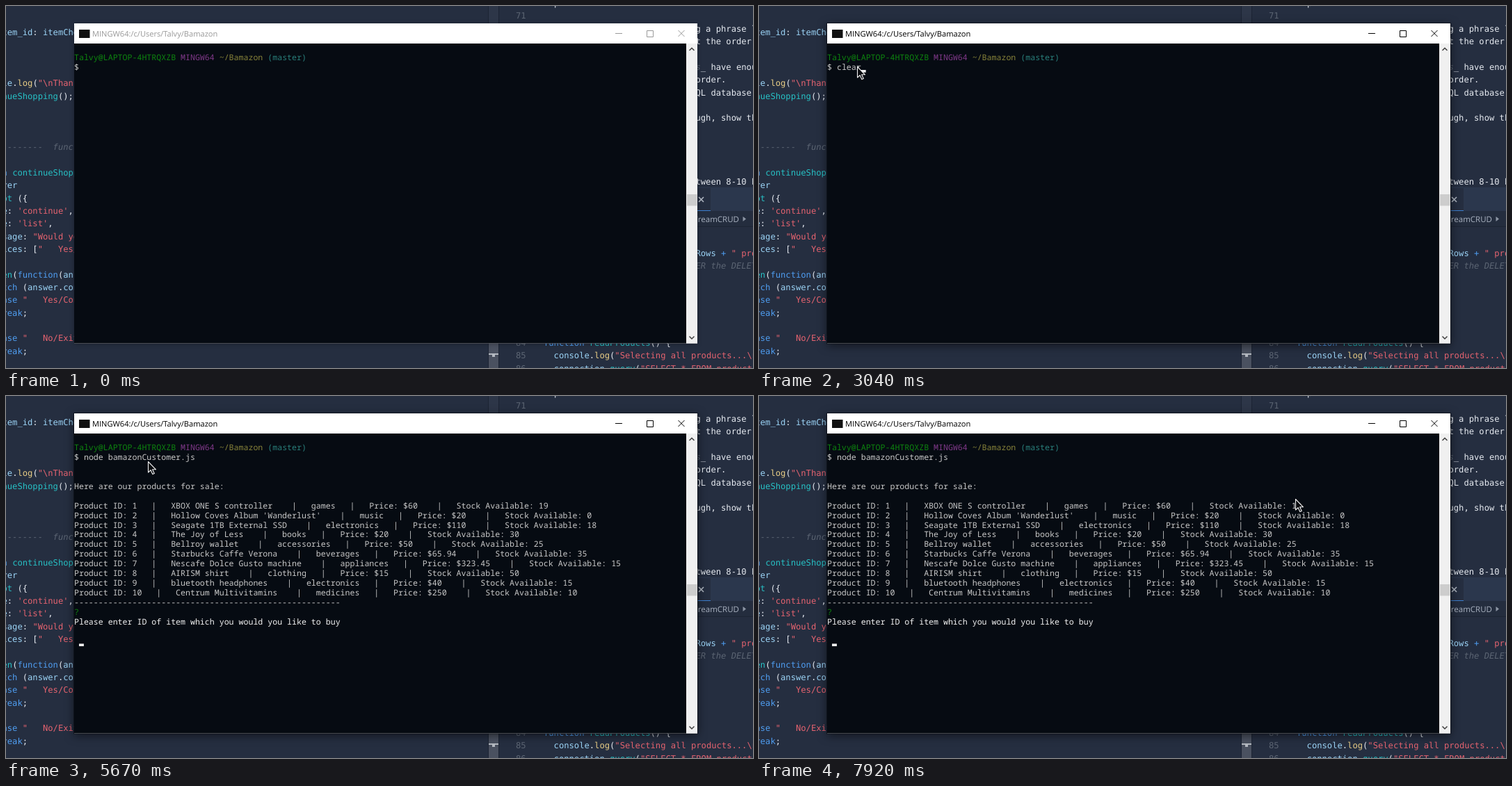
An HTML page for the animation above (8 s loop, 1074x521 px).

```html
<!DOCTYPE html>
<html lang="en">
<head>
<meta charset="utf-8">
<title>Terminal session</title>
<style>
  html, body { margin: 0; width: 100%; height: 100%; overflow: hidden; background: #252e40; }
  svg { display: block; }
  text { white-space: pre; text-rendering: geometricPrecision; }
  .code { font: 12.15px "DejaVu Sans Mono", monospace; }
  .term { font: 11.6px "Noto Sans Mono", monospace; }
  .ui { font: 11.1px "Open Sans", sans-serif; }
  .line { fill: none; stroke-width: 1; }
</style>
</head>
<body>
<svg width="1074" height="521" viewBox="0 0 1074 521" xml:space="preserve">
  <g id="editor">
    <rect width="1074" height="521" fill="#252e40"/>
    <rect x="694" width="14" height="521" fill="#2d3648"/>
    <path class="line" d="M693.5 0V521M708.5 0V521" stroke="#1c2433"/>
    <rect x="694" y="485" width="14" height="36" fill="#4a5160"/>
    <path d="M694 500h14v2h-5v3h-4v-3h-5z" fill="#b4b9c1"/>
    <rect x="980" y="261" width="94" height="34" fill="#2b374d"/>
    <rect x="980" y="262" width="33" height="33" fill="#252e40"/>
    <rect x="980" y="294" width="33" height="1" fill="#3d7fd0"/>
    <rect x="980" y="295" width="94" height="22" fill="#242d3e"/>
    <rect x="980" y="317" width="94" height="1" fill="#1d2534"/>
    <path class="line" d="M996 275l7 7m0-7l-7 7" stroke="#aeb5c0" style="stroke-width:1.6"/>
    <text class="ui" x="1054" y="311" text-anchor="end" fill="#a9b2c0" style="font-size:11.5px">IceCreamCRUD</text>
    <path d="M1059.5 303l4.5 3.5-4.5 3.5z" fill="#8d96a5"/>
  </g>
  <rect id="border" x="97.5" y="24.5" width="897" height="461.5" fill="none" stroke="#0a0e16" stroke-opacity=".6"/>
  <rect id="frame" x="98" y="25" width="896" height="460.5" fill="#fff"/>
  <rect x="105" y="34" width="15.5" height="12" fill="#111"/>
  <text class="ui" id="title" x="124" y="44">MINGW64:/c/Users/Talvy/Bamazon</text>
  <path class="line" id="controls" d="M876 39.5h10M921.5 35.5h9v9h-9zM966.5 35l9 9m0-9l-9 9"/>
  <rect x="98" y="54" width="880" height="431.5" fill="#060b12"/>
  <rect x="978" y="54" width="16" height="431.5" fill="#f0f0f0"/>
  <rect x="979" y="271" width="14.5" height="16.5" fill="#cdcdcd"/>
  <path class="line" d="M982.5 64l3.5-3.5 3.5 3.5M982.5 475.5l3.5 3.5 3.5-3.5" stroke="#404040" style="stroke-width:1.5"/>
  <g id="prompt"></g>
  <g id="products"></g>
  <g id="question"></g>
  <rect id="caret" width="6.96" height="3.6" fill="#f0f0f0"/>
  <circle id="click" cx="141" cy="87" r="11.5" fill="#ff0" opacity=".64"/>
  <path id="mouse" d="M.5.5V16l3.6-3.3 2.7 5.9 2.5-1.1-2.7-5.7h4.9z"
        fill="#0a0c10" stroke="#f4f4f4" stroke-width="1.1" stroke-linejoin="round"/>
</svg>
<script>
const $ = id => document.getElementById(id);
const SVG = 'http://www.w3.org/2000/svg';
const COLORS = {
  w: '#e6eaf0', k: '#9bd3f5', b: '#4f9df0', s: '#e5636f', t: '#27c0c4', y: '#e8cd85',
  c: '#5c6573', i: '#5c6573',
  G: '#0d850f', P: '#80398a', O: '#87833a', T: '#2a807c', n: '#c8c8c8', W: '#f2f2f2'
};

// Markup: runs separated by "~~", each starting with its colour key; "i" is also italic.
function addText(parent, className, x, y, markup) {
  const text = parent.appendChild(document.createElementNS(SVG, 'text'));
  text.setAttribute('class', className);
  text.setAttribute('x', x);
  text.setAttribute('y', y);
  for (const run of markup.split('~~')) {
    const span = text.appendChild(document.createElementNS(SVG, 'tspan'));
    span.setAttribute('fill', COLORS[run[0]]);
    if (run[0] === 'i') span.setAttribute('font-style', 'italic');
    span.textContent = run.slice(1);
  }
  return text;
}

const ROW = 18.35;
function addCode(x, firstY, lines) {
  for (const [row, markup] of Object.entries(lines))
    addText($('editor'), 'code', x, firstY + row * ROW + 4, markup);
}

addCode(-5.5, 38, {
  0: 'ktem_id~~w: ~~kitemChoice',
  4: 'kle~~w.~~ylog~~w(~~s"\\nThank you"',
  5: 'tnueShopping~~w();',
  9: 'i--------  function',
  11: 'bn ~~tcontinueShopping',
  12: 'krer',
  13: 'tpt ~~w({',
  14: "ke~~w: ~~s'continue'~~w,",
  15: "ke~~w: ~~s'list'~~w,",
  16: 'ksage~~w: ~~s"Would you',
  17: 'kices~~w: [~~s"   Yes/',
  19: 'ten~~w(~~bfunction~~w(~~kanswer',
  20: 'btch ~~w(~~kanswer~~w.~~kcon',
  21: 'base ~~s"   Yes/Con',
  22: 'break~~w;',
  24: 'base ~~s"   No/Exit',
  25: 'break~~w;'
});
addCode(991.5, 33, {
  0: 'wg a phrase like',
  1: 'wt the order',
  3: 'is~~w_ have enough',
  4: 'worder.',
  5: 'wQL database',
  7: 'wugh, show the',
  12: 'wtween 8-10 h'
});
addCode(991.5, 356, { 0: 'kRows ~~b+ ~~s" products', 1: 'iER the DELETE' });
addCode(733, 14, { 0: 'c71' });
addCode(788, -4, { 0: 'wp' });
addCode(733, 485, { 0: 'c84', 1: 'c85', 2: 'c86' });
addCode(773, 485, {
  0: 'bfunction ~~treadProducts~~w() {',
  1: 'k  console~~w.~~ylog~~w(~~s"Selecting all products...\\n"',
  2: 'k  connection~~w.~~tquery~~w(~~s"SELECT * FROM products"'
});

const CELL = { w: 6.96, h: 13.92 };
const addTerm = (group, row, markup) =>
  addText($(group), 'term', 98, 78.2 + row * CELL.h, markup);

addTerm('prompt', 0, 'GTalvy@LAPTOP-4HTRQXZB ~~PMINGW64 ~~O~/Bamazon ~~T(master)');
const command = addTerm('prompt', 1, 'n$ ~~n').lastChild;

addTerm('products', 4, 'nHere are our products for sale:');
[
  ['XBOX ONE S controller', 'games', '60', 19],
  ["Hollow Coves Album 'Wanderlust'", 'music', '20', 0],
  ['Seagate 1TB External SSD', 'electronics', '110', 18],
  ['The Joy of Less', 'books', '20', 30],
  ['Bellroy wallet', 'accessories', '50', 25],
  ['Starbucks Caffe Verona', 'beverages', '65.94', 35],
  ['Nescafe Dolce Gusto machine', 'appliances', '323.45', 15],
  ['AIRISM shirt', 'clothing', '15', 50],
  ['bluetooth headphones', 'electronics', '40', 15],
  ['Centrum Multivitamins', 'medicines', '250', 10]
].forEach(([name, kind, price, stock], i) => addTerm('products', 6 + i,
  `nProduct ID: ${i + 1}   |   ${name}    |   ${kind}   |   Price: $${price}    |   Stock Available: ${stock}`));
addTerm('products', 16, 'n' + '-'.repeat(55));
addTerm('question', 17, 'G?');
addTerm('question', 18, 'WPlease enter ID of item which you would you like to buy');

// [time, column, row]; no cell means the caret is hidden.
const CARET = [
  [0], [2410, 2, 1], [2960], [3040, 7, 1], [3420, 26, 1], [3500], [4030, 26, 1],
  [4430, 0, 2], [4580], [4890, 0, 17], [4980, 1, 20], [5060], [5580, 1, 20],
  [6140], [6690, 1, 20], [7230], [7770, 1, 20]
];

// Pointer moves: cubic curves sampled in even steps, held between samples.
const MOVES = [
  { start: 230, end: 470, steps: 4, from0: true, path: [[845, 431], [690, 340], [430, 260], [386, 239]] },
  { start: 1160, end: 1630, steps: 7, path: [[386, 239], [200, 130], [26, 24], [141, 87]] },
  { start: 5580, end: 6140, steps: 8, path: [[141, 87], [200, 88], [380, 128], [404, 132]] },
  { start: 6840, end: 7380, steps: 8, path: [[404, 132], [700, 105], [859, 117], [778, 147]] },
  { start: 7460, end: 7610, steps: 3, path: [[778, 147], [778, 148], [775, 148], [774, 148]] },
  { start: 7690, end: 7920, steps: 4, path: [[774, 148], [773, 149], [772, 149], [771, 148]] }
];

const lastBefore = (list, t, time) => list.filter(item => time(item) <= t).pop();

function pointerAt(t) {
  const move = lastBefore(MOVES, t, m => m.start);
  if (!move) return null;
  const { start, end, steps, from0, path } = move;
  const step = Math.min(steps - 1, Math.floor((t - start) / (end - start) * (steps - 1) + 0.03));
  const u = from0 ? step / (steps - 1) : (step + 1) / steps, v = 1 - u;
  const weights = [v * v * v, 3 * u * v * v, 3 * u * u * v, u * u * u];
  return [0, 1].map(axis => Math.round(weights.reduce((sum, w, i) => sum + w * path[i][axis], 0)));
}

const show = (id, visible) => $(id).setAttribute('visibility', visible ? 'visible' : 'hidden');

function render(t) {
  const active = t >= 1950;
  $('title').setAttribute('fill', active ? '#000' : '#999');
  $('controls').setAttribute('stroke', active ? '#000' : '#999');
  show('border', active);
  $('frame').style.filter = active
    ? 'drop-shadow(0 3px 7px rgba(0,0,0,.55))'
    : 'drop-shadow(0 1px 3px rgba(0,0,0,.3))';

  const typed = t < 2960 ? '' : t < 3420 ? 'clear' : 'node bamazonCustomer.js';
  if (command.textContent !== typed) command.textContent = typed;
  show('products', t >= 4890);
  show('question', t >= 4980);

  const [, column, row] = lastBefore(CARET, t, c => c[0]);
  show('caret', row !== undefined);
  if (row !== undefined) {
    $('caret').setAttribute('x', 98 + column * CELL.w);
    $('caret').setAttribute('y', 78.1 + row * CELL.h);
  }

  const pointer = pointerAt(t);
  show('mouse', pointer);
  if (pointer) $('mouse').setAttribute('transform', `translate(${pointer})`);
  show('click', t >= 1950 && t < 2100);
}

const origin = performance.now();
function tick() {
  render((performance.now() - origin) % 8000);
  requestAnimationFrame(tick);
}
tick();
</script>
</body>
</html>
```
